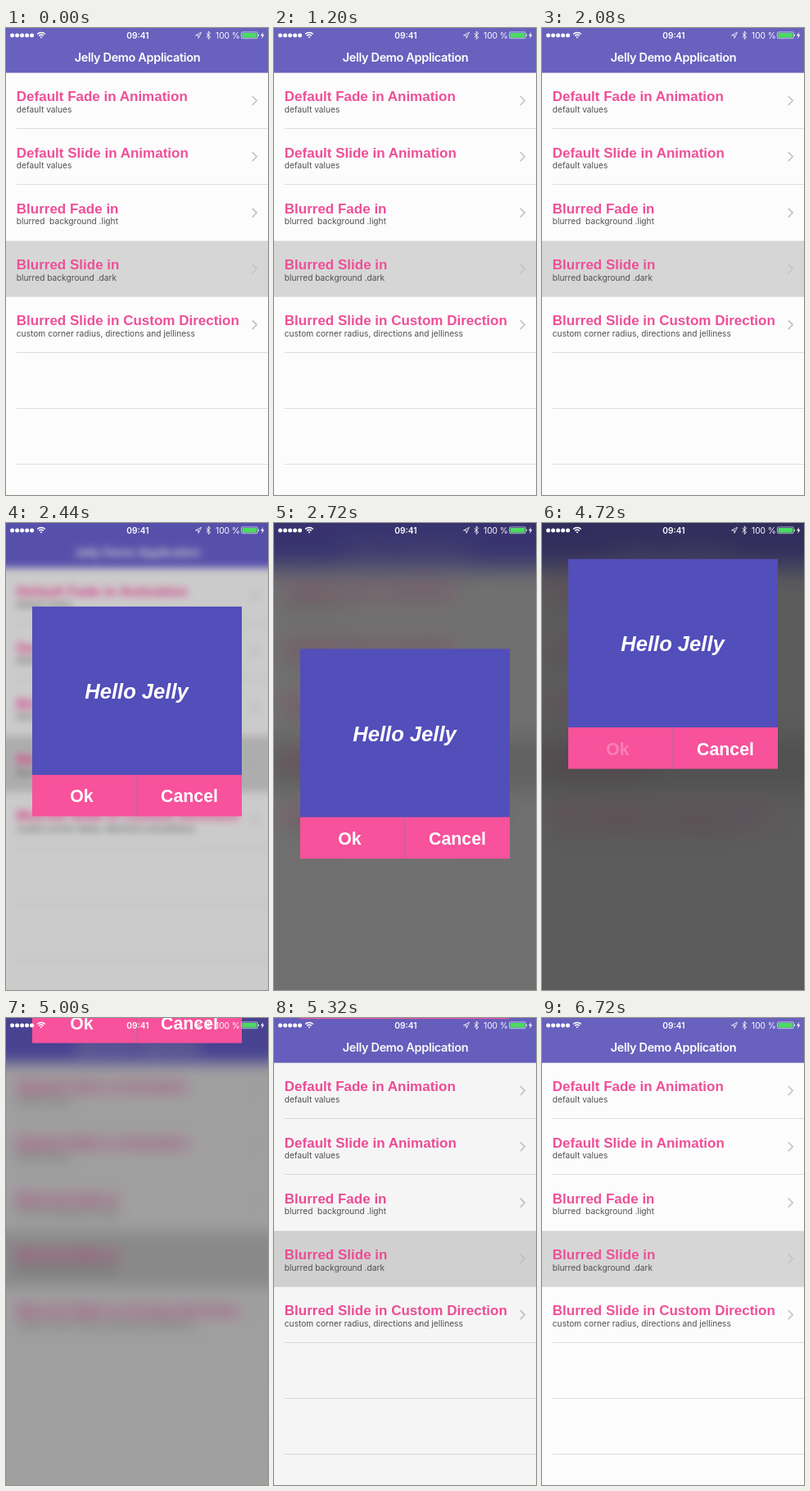
An HTML page for the animation above (6760 ms loop, 320 by 569 pixels).

```html
<!DOCTYPE html>
<html lang="en">
<head>
<meta charset="utf-8">
<title>Jelly Demo Application</title>
<style>
  html, body { margin: 0; width: 100%; height: 100%; overflow: hidden; }
  #stage { position: relative; width: 320px; height: 569px; overflow: hidden; background: #fcfcfc; }
  #stage > * { position: absolute; left: 0; top: 0; }
  /* The page bleeds past the stage so that its blur has no soft rim. */
  #stage > #page { left: -60px; top: -60px; }
  #stage > #dialog { left: 32px; }
  #tint { width: 320px; height: 569px; background: rgb(28, 28, 28); }
  text { white-space: pre; }
  .nav { font: 600 14.5px Inter, sans-serif; letter-spacing: -.35px; fill: #fff; text-anchor: middle; }
  .title { font: bold 17px "Liberation Sans", Arial, sans-serif; fill: #ef4f98; }
  .detail { font: 10.2px Inter, sans-serif; fill: #505050; }
  .line { fill: #dddde0; }
  .chevron { fill: none; stroke: #c4c4c9; stroke-width: 1.7; }
  .hello { font: italic bold 25.6px "Liberation Sans", Arial, sans-serif; }
  .button { font: bold 21.3px "Liberation Sans", Arial, sans-serif; }
  #dialog text { fill: #fff; text-anchor: middle; }
  #status { fill: #fff; font: 10.2px Inter, sans-serif; }
  #status .stroke { fill: none; stroke: #fff; }
</style>
</head>
<body>
<div id="stage">
  <svg id="page" width="440" height="689" viewBox="-60 -60 440 689">
    <rect x="-60" y="-60" width="440" height="689" fill="#fcfcfc"/>
    <g id="rows"></g>
    <rect x="-60" y="-60" width="440" height="114.6" fill="#6861be"/>
    <text class="nav" x="160.5" y="41">Jelly Demo Application</text>
  </svg>
  <div id="tint"></div>
  <svg id="dialog" width="256" height="256">
    <rect width="256" height="206" fill="#524eba"/>
    <rect y="205.3" width="256" height="50.7" fill="#f7529b"/>
    <rect x="127" y="205.3" width="1.5" height="50.7" fill="#c9609a"/>
    <text class="hello" x="127.5" y="112.4">Hello Jelly</text>
    <text class="button" id="ok" x="60.5" y="238.8">Ok</text>
    <text class="button" x="192" y="238.8">Cancel</text>
  </svg>
  <svg id="status" width="320" height="18">
    <g id="signal"></g>
    <g class="stroke" stroke-width="1.5">
      <path d="M38.2 7.5a6.6 6.6 0 0 1 9.6 0"/>
      <path d="M40.2 9.5a3.9 3.9 0 0 1 5.6 0"/>
    </g>
    <path d="M41.6 11a2 2 0 0 1 2.8 0L43 12.6Z"/>
    <text x="161" y="12.6" font-weight="600" text-anchor="middle">09:41</text>
    <path class="stroke" stroke-width=".8" d="M231.5 9 238.5 5.3 235 12.4V9Z"/>
    <path class="stroke" stroke-width=".9" d="M244.7 6.4 249.7 11.2 247.2 13.6V4L249.7 6.4 244.7 11.2"/>
    <text x="256" y="12.6">100 %</text>
    <rect class="stroke" stroke-width=".8" stroke-opacity=".75" x="287.4" y="4.9" width="20" height="7.8" rx="1.6"/>
    <rect x="288.4" y="5.9" width="18" height="5.8" rx=".8" fill="#4cd964"/>
    <path d="M308.2 7.4a1.5 1.5 0 0 1 0 2.8Z"/>
    <path d="M314 5 311 9.3H313L312.2 13 315.4 8.2H313.3Z"/>
  </svg>
</div>
<script>
const LOOP = 6760, STEP = 40;
const DURATION = 800, SHOW = 2135, PRESS = 4530, HIDE = 4631, RELEASE = 470;
const REST = 156.9, HIDDEN = -256;
const BLUR = 16, TINT = 0.73, SATURATION = 0.8;
const HEADER = 54.6, ROW = 68.27, SELECTED = 3;

const byId = id => document.getElementById(id);
const page = byId('page'), tint = byId('tint'), dialog = byId('dialog'), ok = byId('ok');

const items = [
  ['Default Fade in Animation', 'default values'],
  ['Default Slide in Animation', 'default values'],
  ['Blurred Fade in', 'blurred  background .light'],
  ['Blurred Slide in', 'blurred background .dark'],
  ['Blurred Slide in Custom Direction', 'custom corner radius, directions and jelliness']
];

function row(index) {
  const top = HEADER + ROW * index, item = items[index];
  // A selected row hides the separators on both of its sides.
  let svg = index === SELECTED
    ? `<rect x="-60" y="${top}" width="440" height="${ROW}" fill="#d6d6d6"/>`
    : index + 1 === SELECTED ? ''
    : `<rect class="line" x="12.8" y="${Math.floor(top + ROW - 0.5)}" width="368" height="1"/>`;
  if (item) svg += `
    <text class="title" x="12.8" y="${top + 34.8}">${item[0]}</text>
    <text class="detail" x="12.8" y="${top + 48.3}">${item[1]}</text>
    <path class="chevron" d="M300.8 ${top + 28.4}l5.3 5.5-5.3 5.5"/>`;
  return svg;
}

byId('rows').innerHTML = [0, 1, 2, 3, 4, 5, 6].map(row).join('');
byId('signal').innerHTML = [0, 1, 2, 3, 4]
  .map(i => `<circle cx="${7.6 + 6 * i}" cy="9" r="2.5"/>`).join('');

const clamp = x => Math.min(1, Math.max(0, x));

// cubic-bezier(.42, 0, .58, 1)
function easeInOut(x) {
  let low = 0, high = 1;
  for (let i = 0; i < 24; i++) {
    const u = (low + high) / 2, v = 1 - u;
    if (3 * v * u * (0.42 * v + 0.58 * u) + u ** 3 < x) low = u; else high = u;
  }
  return low * low * (3 - 2 * low);
}

// Critically damped spring, within 0.1% of its goal at x = 1
function spring(x) {
  const k = 9.23 * x;
  return x >= 1 ? 1 : 1 - (1 + k) * Math.exp(-k);
}

function render(time) {
  const entering = clamp((time - SHOW) / DURATION);
  const leaving = clamp((time - HIDE) / DURATION);
  const shown = spring(entering) - spring(leaving);
  const dim = easeInOut(entering) - easeInOut(leaving);

  dialog.style.transform = `translateY(${HIDDEN + (REST - HIDDEN) * shown}px)`;
  dialog.style.visibility = shown > 0 ? 'visible' : 'hidden';
  page.style.filter = dim > 0.001
    ? `blur(${BLUR * dim}px) saturate(${1 + SATURATION * dim})` : 'none';
  tint.style.opacity = TINT * dim;
  ok.style.opacity = time < PRESS ? 1 : 0.2 + 0.8 * easeInOut(clamp((time - HIDE) / RELEASE));
}

const start = performance.now();
function tick() {
  const time = (performance.now() - start) % LOOP;
  render(Math.floor(time / STEP) * STEP);
  requestAnimationFrame(tick);
}
tick();
</script>
</body>
</html>
```
